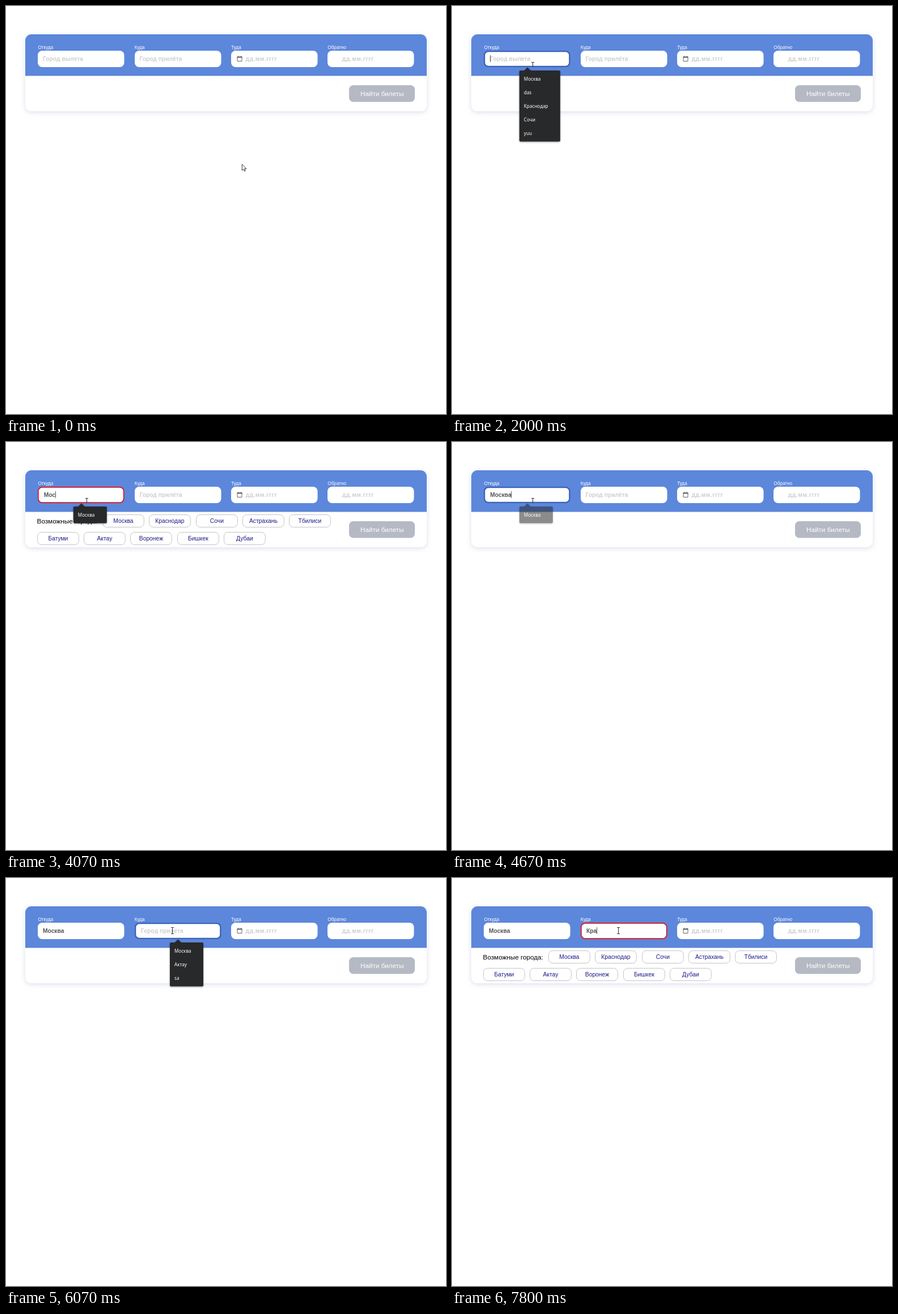
Animation, 776 px wide and 721 px high, one loop 8000 ms. Source, as an HTML page:

```html
<!DOCTYPE html>
<html lang="ru">
<head>
<meta charset="utf-8">
<style>
  html, body { margin: 0; width: 100%; height: 100%; overflow: hidden; background: #fff; }
  svg { display: block; font-family: "Liberation Sans", Arial, sans-serif; }
  .panel { filter: drop-shadow(0 2px 5px rgba(80, 95, 160, .2)); }
  .label { font-size: 8.2px; fill: #fff; }
  .field { font-size: 10.25px; font-weight: bold; fill: #555; }
  .hint { fill: #cecece; }
  .date { letter-spacing: .5px; }
  .big { font-size: 11.7px; }
  .chip { font-size: 10.3px; fill: #1d1a8a; text-anchor: middle; }
  .menu { font: 8.1px "Noto Sans", "Open Sans", sans-serif; fill: #fff; }
  .box { filter: drop-shadow(0 1px 1.5px rgba(0, 0, 0, .4)); }
</style>
</head>
<body>
<svg width="776" height="721" viewBox="0 0 776 721">
  <defs>
    <clipPath id="inputs"><path d="M56 79h153v29h-153zM227 79h153v29h-153z"/></clipPath>
  </defs>
  <rect class="panel" x="34" y="50" width="708" height="136" rx="11" fill="#fff"/>
  <path d="M34 123.5V61a11 11 0 0 1 11-11H731a11 11 0 0 1 11 11V123.5Z" fill="#5c87db"/>
  <rect x="605" y="140" width="116" height="29.5" rx="7.5" fill="#b5b9c3"/>
  <text class="big" x="663.3" y="159" fill="#fff" text-anchor="middle">Найти билеты</text>
  <g id="form"></g>
  <g id="live"></g>
</svg>
<script>
const LOOP = 8000, BLINK = 500, FADE = 240, FILTER_DELAY = 130;
const CITIES = ['Москва', 'Краснодар', 'Сочи', 'Астрахань', 'Тбилиси', 'Батуми', 'Актау', 'Воронеж', 'Бишкек', 'Дубаи'];

// keys(t): how many letters of the word are typed
const FIELDS = [
  {
    focus: 1000, blur: 5530, typing: [3065, 4595], close: 4560, menuX: 118.8,
    hint: 'Город вылета', word: 'Москва', items: ['Москва', 'das', 'Краснодар', 'Сочи', 'yuu'],
    keys: p => 1 + 5 * (1 - (1 - p) ** (1 / 1.9))
  },
  {
    focus: 5530, blur: LOOP, typing: [7065, LOOP], close: 7030, menuX: 289,
    hint: 'Город прилёта', word: 'Кра', items: ['Москва', 'Актау', 'sa'],
    keys: p => 1 + 2.6 * p
  }
];

const $ = id => document.getElementById(id);
const clamp = v => Math.min(1, Math.max(0, v));
const text = (cls, x, y, s) => `<text class="${cls}" x="${x}" y="${y}">${s}</text>`;
const rect = (x, y, w, h, r, style) =>
  `<rect x="${x}" y="${y}" width="${w}" height="${h}" rx="${r}" ${style}/>`;
const fieldX = i => Math.round(56.2 + i * 170.4);

// Input box whose border lies inside its edges
const input = (i, border = 0, color = 'none') => rect(fieldX(i) + border / 2, 79 + border / 2,
  152.5 - border, 29 - border, 8 - border / 2, `fill="#fff" stroke="${color}" stroke-width="${border}"`);

$('form').innerHTML = ['Откуда', 'Куда', 'Туда', 'Обратно'].map((s, i) =>
  text('label', 56.4 + i * 170.3, 76, s) + (i > 1 ? input(i) + text('field hint date', 81.6 + i * 170.4, 97, 'дд.мм.гггг') : '')
).join('') +
  '<path d="M408 90h8v7.5h-8z" fill="none" stroke="#666"/><path d="M407.5 89.5h9v2h-9zM409 88h1v2h-1zM414 88h1v2h-1z" fill="#666"/>';

const cityList = text('big', 54.6, 143.6, 'Возможные города:') + CITIES.map((s, i) => {
  const row = Math.floor(i / 5), x = Math.round((row ? 54.8 : 170) + i % 5 * 82.25) + .5, y = 128.5 + row * 31;
  return rect(x, y, 72.8, 22, 7, 'fill="#fff" stroke="#c4c4c8"') + text('chip', x + 36.4, y + 14.6, s);
}).join('');

const pen = document.createElement('canvas').getContext('2d');
function textWidth(font, s) {
  pen.font = font;
  return pen.measureText(s).width;
}

function typed({ typing: [start, end], word, keys }, t) {
  return t < start ? '' : word.slice(0, Math.floor(keys(clamp((t - start) / (end - start)))));
}

function field(f, i, t) {
  const value = typed(f, t), focused = t >= f.focus && t < f.blur;
  const invalid = focused && value && !CITIES.includes(value);
  const border = invalid ? 1.7 : focused ? 2.3 : 0;
  const x = 65 + i * 170.4 + border;
  let out = input(i, border, invalid ? '#e01018' : '#3a62b8') +
    (value ? text('field', x, 97, value) : text('field hint', x, 97, f.hint));
  if (focused) {
    // The caret stays solid while typing and blinks afterwards
    const [start, end] = f.typing;
    const idle = t < start ? t - f.focus : Math.max(0, t - end);
    const cx = Math.floor(x + textWidth('bold 10.25px "Liberation Sans", Arial, sans-serif', value));
    if (Math.floor(idle / BLINK) % 2 === 0) out += rect(cx, 87, 1, 12, 0, 'fill="#555"');
  }
  return out + (invalid ? cityList : '');
}

function menu(f, t) {
  const opacity = t < f.focus ? 0 : clamp(1 - (t - f.close) / FADE);
  if (!opacity) return '';
  const prefix = typed(f, Math.min(t, f.close) - FILTER_DELAY);
  const items = f.items.filter(s => s.startsWith(prefix));
  const widest = Math.max(...items.map(s => textWidth('8.1px "Noto Sans", "Open Sans", sans-serif', s)));
  const x = f.menuX, w = Math.max(56, Math.round(widest + 29)), h = 5.5 + 24 * items.length;
  return `<g opacity="${opacity}"><g class="box" fill="#28292b">${rect(x, 114, w, h, 2, '')}` +
    `<path d="M${x + 8} 114.5l6.3 -6 6.3 6z"/></g>` +
    items.map((s, i) => text('menu', x + 8, 132 + i * 24, s)).join('') + '</g>';
}

// Eased cubic Bezier through four control points
function glide(t, start, end, ...points) {
  const p = clamp((t - start) / (end - start)), u = p * p * (3 - 2 * p), v = 1 - u;
  return [0, 1].map(k => points.reduce((sum, pt, i) =>
    sum + pt[k] * [v * v * v, 3 * v * v * u, 3 * v * u * u, u * u * u][i], 0));
}

function cursor(t) {
  const [x, y] = t < 5000
    ? glide(t, 0, 730, [416, 279], [510, 230], [55, 104], [142.5, 105])
    : glide(t, 5000, 5270, [142.5, 105], [180, 108], [240, 102], [293.5, 93]);
  const inside = y > 79 && y < 108 && (x > 56 && x < 209 || x > 227 && x < 379);
  return inside
    ? `<g clip-path="url(#inputs)"><path transform="translate(${x} ${y})" fill="none" stroke="#333" d="M-2.5 -5.5h5M0 -5.5v11M-2.5 5.5h5"/></g>`
    : `<path transform="translate(${x + .3} ${y + .6})" fill="#fff" stroke="#222" stroke-width=".9" d="M0 0V11L2.6 8.7 4.3 12.4 6 11.6 4.4 8H7.7Z"/>`;
}

let last = '';
function draw() {
  const t = performance.now() % LOOP;
  const markup = FIELDS.map((f, i) => field(f, i, t)).join('') +
    FIELDS.map(f => menu(f, t)).join('') + cursor(t);
  if (markup !== last) $('live').innerHTML = last = markup;
  requestAnimationFrame(draw);
}
draw();
</script>
</body>
</html>
```
